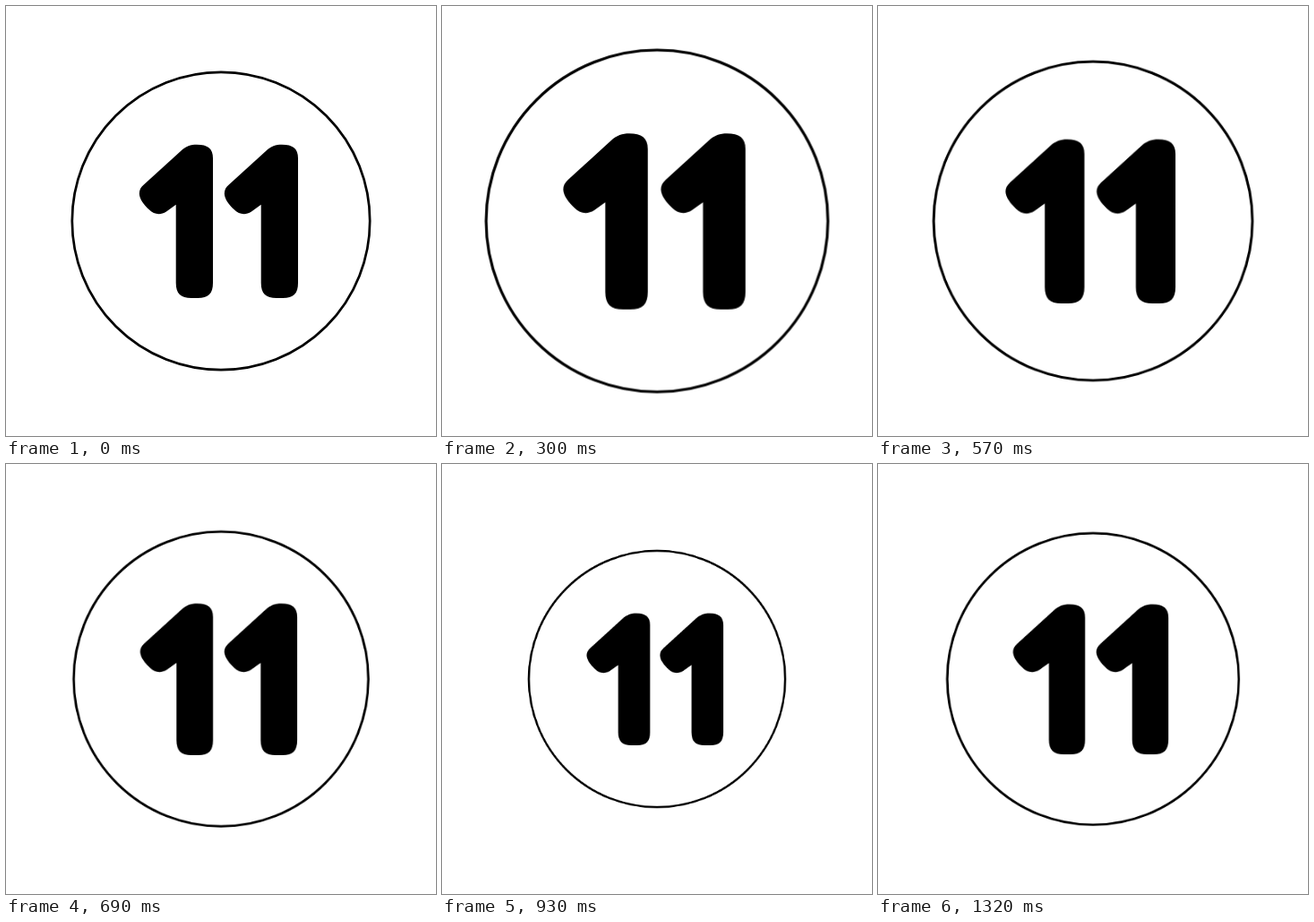
Write an HTML page that moves like this. It is 480 by 480 pixels and loops after 1350 ms.

```html
<!DOCTYPE html>
<html lang="en">
<head>
<meta charset="utf-8">
<title>Pulsing 11</title>
<style>
  html, body { margin: 0; width: 100%; height: 100%; overflow: hidden; background: #fff; }
  svg { display: block; width: 100vw; height: 100vh; }
  #badge { transform-origin: 0 0; }
</style>
</head>
<body>
<svg viewBox="-240 -240 480 480" role="img" aria-label="11">
  <defs>
    <path id="one" d="M189.7 221.8L179 229.5C172 234 165 232.5 160 227.5C154 222 149 215.5 148.8 209.5
      C148.7 205.5 150.5 202.5 153.5 199.8L195 162C201 156.5 206 154.8 213 154.8
      C225 154.8 231 159 231 170V309C231 321 226 326 214 326H207C195 326 189.7 321 189.7 309Z"/>
  </defs>
  <g id="badge">
    <circle r="166.2" fill="#fff" stroke="#000" stroke-width="2.7"/>
    <use href="#one" x="-240" y="-240"/>
    <use href="#one" x="-145" y="-240"/>
  </g>
</svg>
<script>
  const LOOP = 1350, STEP = 30, SWELL = 0.15;
  const count = LOOP / STEP;

  // One sine pulse per loop, held for 30 ms at a time.
  const frames = Array.from({ length: count + 1 }, (_, i) => ({
    offset: i / count,
    transform: `scale(${1 + SWELL * Math.sin(2 * Math.PI * i / count)})`,
    easing: 'steps(1, end)'
  }));

  document.getElementById('badge').animate(frames, { duration: LOOP, iterations: Infinity });
</script>
</body>
</html>
```
